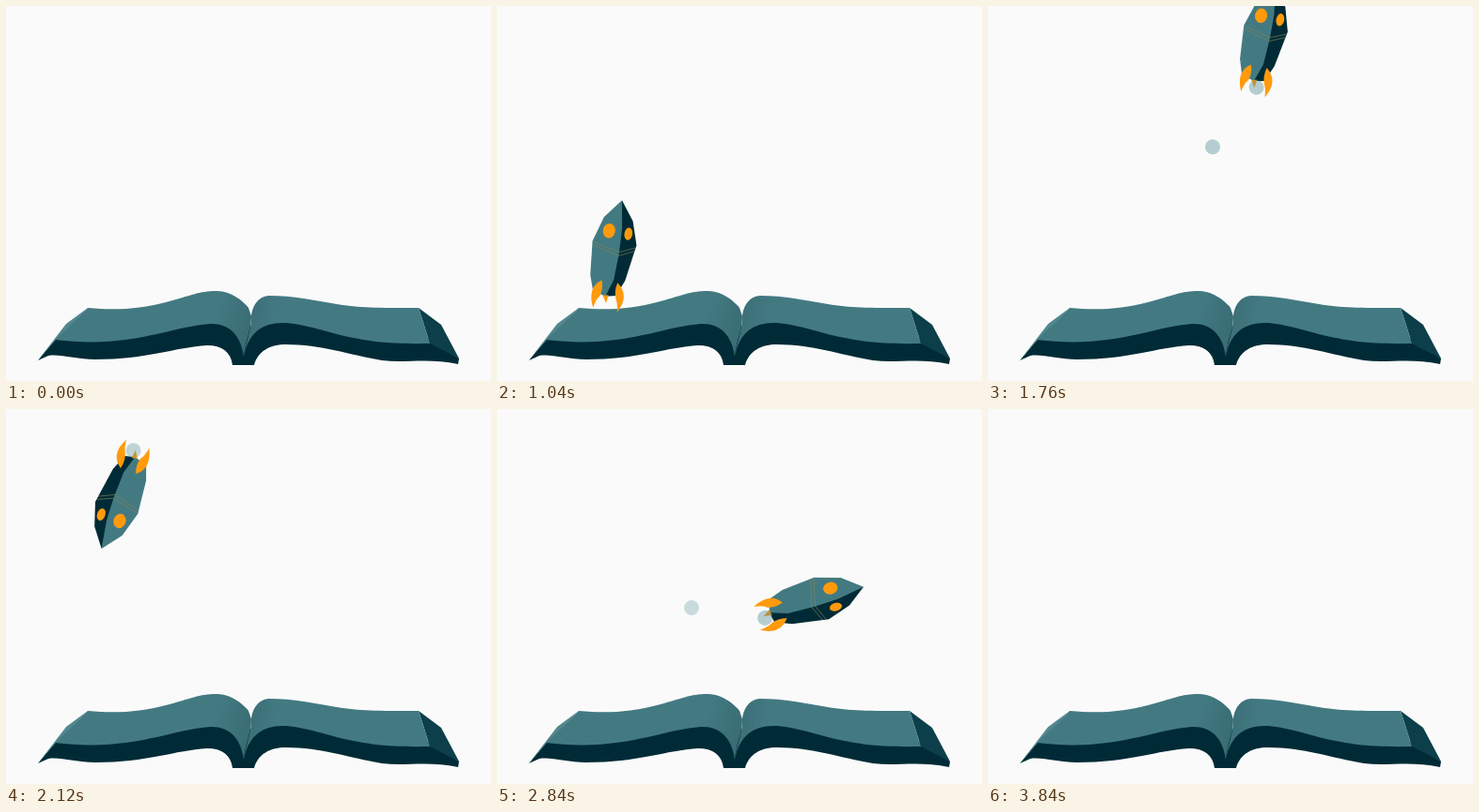
Animation of 516x400 px, one loop 5 s. Source, as an HTML page:

```html
<!DOCTYPE html>
<html lang="en">
<head>
<meta charset="utf-8">
<title>Book and rocket</title>
<style>
  html, body { margin: 0; width: 100%; height: 100%; overflow: hidden; background: #fafafa; }
  svg { display: block; width: 516px; height: 400px; }
</style>
</head>
<body>
<svg viewBox="0 0 516 400" xmlns="http://www.w3.org/2000/svg">
  <defs>
    <linearGradient id="leftShade" gradientUnits="userSpaceOnUse" x1="222" y1="325" x2="260" y2="338">
      <stop offset="0" stop-color="#437a82"/>
      <stop offset="1" stop-color="#3a6d74"/>
    </linearGradient>
    <linearGradient id="rightShade" gradientUnits="userSpaceOnUse" x1="260" y1="335" x2="288" y2="340">
      <stop offset="0" stop-color="#3d7078"/>
      <stop offset="1" stop-color="#437a82"/>
    </linearGradient>
    <clipPath id="abovePage"><path d="M0 0H516V342L134 344L124 346L96 338H0Z"/></clipPath>
  </defs>

  <g id="book">
    <path fill="#002b36" d="M34 378L52 356L60 350L215 325L253 345L290 325L445 352L482 376L481 382C450 375 425 381 400 378C365 372 335 361 298 361C281 361 268 368 264 383H241C239 369 230 362 214 362C180 364 150 377 95 377C75 377 58 371 45 373Z"/>
    <path fill="#0c3f4a" d="M439 322L463 340L482 376L451 360Z"/>
    <path fill="#528890" d="M87 322L64 339L34 378L53 356Z"/>
    <path fill="url(#leftShade)" d="M87 322C118 325 143 323 170 316S205 304 224 304C236 304 248 310 258 322L261 331C261 346 254 358 253 374C250 350 236 338 217 339C175 342 132 366 52 356Z"/>
    <path fill="url(#rightShade)" d="M439 322C395 322 375 322 352 318S305 309 280 309C267 310 262 321 261 331C261 347 255 358 253 374C257 351 271 338 294 338C315 338 345 349 365 353S405 361 451 360Z"/>
  </g>

  <g clip-path="url(#abovePage)">
    <g id="rocket" visibility="hidden">
      <path fill="#437a82" d="M0 0L-16 20.5L-24 48L-20.5 84L-15 100L-1 104L10 85V30Z"/>
      <path fill="#002b36" d="M0 0L15 20L23 45L17 84L10 101.500L-1 104L5 85L6 56L5 30Z"/>
      <path fill="none" stroke="#858055" stroke-width=".6" d="M-23 48.500L6 55L22 48M-23 52L6 59L22 51.500"/>
      <g fill="#ff9a0d">
        <ellipse cx="-8.300" cy="34.300" rx="6.500" ry="7.800"/>
        <ellipse cx="12.500" cy="34.300" rx="4.300" ry="6.700"/>
        <path d="M-7.500 87.500Q-22 97 -12 118Q-10 107 -7.500 105.500Q-4 98 -7.500 87.500Z"/>
        <path d="M9.500 87.500Q25 99 14 118.500Q13 109 10.500 105Q7 97 9.500 87.500Z"/>
        <path d="M-4 103.500L2 102L1 111Z"/>
      </g>
      <g id="smoke" fill="#4b8993"></g>
    </g>
  </g>
</svg>
<script>
const LOOP = 5000, STEP = 40, PUFF_LOOP = 640;

// key poses: time, centre x, centre y, heading in degrees
const path = [
  [40, 117, 398, 0], [600, 117, 310, 0], [1120, 132, 246, 12],
  [1360, 204, 178, 28], [1680, 276, 79, 40], [1840, 296, -20, -30],
  [1960, 205, -35, -95], [2120, 119, 100, -160.5], [2320, 95, 190, -210],
  [2480, 170, 224, -262], [2840, 340, 204, -286], [3360, 459, 120, -326],
  [3840, 580, -70, -328]
];

// smoke behind the nose: x, y, radius, start and end within the puff loop
const puffs = [
  [3, 110, 8, -20, 500], [-29, 182, 8, 68, 675], [-7, 138.5, 24, 510, 900],
  [11, 128, 14, 495, 900], [19, 146.5, 8, 570, 900]
];

const rocket = document.getElementById("rocket");
const smoke = document.getElementById("smoke");

const circles = puffs.map(([cx, cy, r]) => {
  const c = document.createElementNS("http://www.w3.org/2000/svg", "circle");
  Object.entries({ cx, cy, r, opacity: 0 }).forEach(([k, v]) => c.setAttribute(k, v));
  return smoke.appendChild(c);
});

function slope(i, k) {
  const a = path[Math.max(i - 1, 0)], b = path[Math.min(i + 1, path.length - 1)];
  return (b[k] - a[k]) / (b[0] - a[0]);
}

// cubic Hermite curve through the key poses
function pose(t) {
  let i = 0;
  while (i < path.length - 2 && t >= path[i + 1][0]) i++;
  const a = path[i], b = path[i + 1], d = b[0] - a[0];
  const u = (t - a[0]) / d, v = 1 - u;
  return [1, 2, 3].map(k =>
    v * v * (1 + 2 * u) * a[k] + u * u * (3 - 2 * u) * b[k] +
    d * u * v * (v * slope(i, k) - u * slope(i + 1, k)));
}

function draw(t) {
  const on = t >= 40 && t < 3840;
  rocket.setAttribute("visibility", on ? "visible" : "hidden");
  if (!on) return;

  const [x, y, turn] = pose(t);
  rocket.setAttribute("transform", `translate(${x} ${y}) rotate(${turn}) translate(0 -52)`);

  const phase = (t + 470) % PUFF_LOOP, lit = t >= 1240;
  puffs.forEach(([, , , start, end], i) => {
    const level = Math.min(1, (phase - start) / 60, (end - phase) / 120);
    circles[i].setAttribute("opacity", lit ? 0.4 * Math.max(0, level) : 0);
  });
}

const begin = performance.now();
function tick(now) {
  const t = Math.max(0, now - begin) % LOOP;
  draw(Math.floor(t / STEP) * STEP);
  requestAnimationFrame(tick);
}
draw(0);
requestAnimationFrame(tick);
</script>
</body>
</html>
```
